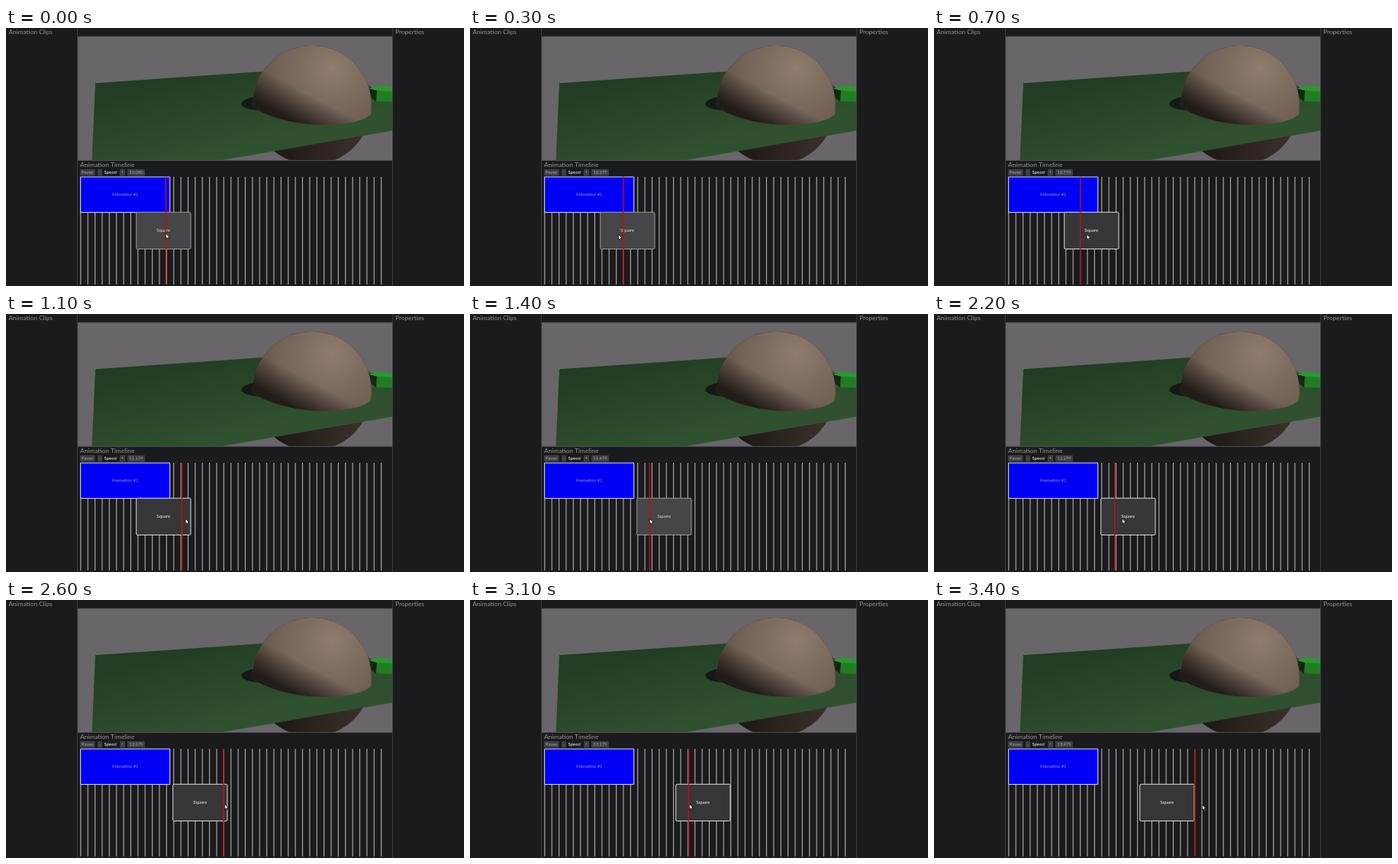
Write an HTML page with a canvas that moves like this. It is 600x338 px and loops after 3500 ms.

```html
<!DOCTYPE html>
<html lang="en">
<head>
<meta charset="utf-8">
<title>Animation timeline editor</title>
<style>
  html, body { margin: 0; width: 100%; height: 100%; overflow: hidden; background: #1b1a1c; }
  canvas { display: block; width: 600px; height: 338px; }
</style>
</head>
<body>
<canvas id="stage"></canvas>
<script>
const LOOP = 3500, STEP = 100;
const FONT = 'Lato, "Open Sans", sans-serif';
const BALL = { x: 400.7, y: 101, r: 78 };
const GRID = { x: 97.3, y: 195, gap: 9.375, count: 43, h: 141 };

// Each pointer move eases by an offset between two times
const moves = [
  { from: 0, to: 480, dx: -22, dy: 2 },
  { from: 480, to: 1130, dx: 48, dy: -3 },
  { from: 2050, to: 2550, dx: 51, dy: -1 },
  { from: 3080, to: 3370, dx: 65, dy: 1 }
];

// The block jumps by its shift when a drag is released
const drags = [
  { press: 700, release: 1400, shift: 48 },
  { press: 2100, release: 2800, shift: 51 },
  { press: 3000, release: LOOP, shift: 0 }
];

const canvas = document.getElementById('stage');
const ctx = canvas.getContext('2d');
const dpr = window.devicePixelRatio || 1;
canvas.width = 600 * dpr;
canvas.height = 338 * dpr;

function smooth(u) {
  u = Math.min(1, Math.max(0, u));
  return u * u * (3 - 2 * u);
}

function pointerAt(t) {
  let x = 209, y = 269;
  for (const m of moves) {
    const u = smooth((t - m.from) / (m.to - m.from));
    x += m.dx * u;
    y += m.dy * u;
  }
  return { x, y };
}

function blockAt(t) {
  const left = drags.reduce((x, d) => x + (t >= d.release ? d.shift : 0), 170.7);
  const pressed = drags.some(d => t >= d.press && t < d.release);
  return { left, pressed };
}

function rect(x, y, w, h, fill) {
  ctx.fillStyle = fill;
  ctx.fillRect(x, y, w, h);
}

function poly(points, fill) {
  ctx.beginPath();
  points.forEach(([x, y]) => ctx.lineTo(x, y));
  ctx.closePath();
  ctx.fillStyle = fill;
  ctx.fill();
}

function box(x, y, w, h, r, fill, stroke) {
  ctx.beginPath();
  ctx.roundRect(x, y, w, h, r);
  ctx.fillStyle = fill;
  ctx.fill();
  if (stroke) {
    ctx.strokeStyle = stroke;
    ctx.lineWidth = 1;
    ctx.stroke();
  }
}

function text(str, x, y, size, color, align = 'left') {
  ctx.font = `${size}px ${FONT}`;
  ctx.textAlign = align;
  ctx.fillStyle = color;
  ctx.fillText(str, x, y);
}

// Spreads the colours evenly over a gradient
function shade(gradient, ...colors) {
  colors.forEach((c, i) => gradient.addColorStop(i / (colors.length - 1), c));
  return gradient;
}

function drawPanels() {
  rect(0, 0, 600, 338, '#1b1a1c');
  rect(93, 0, 1, 338, '#3b3a3c');
  rect(506, 0, 1, 338, '#3b3a3c');
  text('Animation Clips', 3.5, 8.4, 8.3, '#949395');
  text('Properties', 510, 8.4, 8.4, '#949395');
  text('Animation Timeline', 97, 181.6, 8.4, '#949395');
}

function drawFloor() {
  poly([[117, 72.2], [336, 57], [440, 50], [506, 97], [506, 134.5], [278, 174], [112.5, 174]],
    shade(ctx.createLinearGradient(240, 60, 270, 170), '#233c24', '#284829', '#305130'));

  ctx.beginPath();
  ctx.moveTo(336, 89);
  ctx.bezierCurveTo(300, 92, 300, 105, 330, 108);
  ctx.fillStyle = '#141a14';
  ctx.fill();
}

function drawCube() {
  poly([[476, 79.5], [487, 75], [507, 78], [507, 83], [486, 82]], '#2a9a2c');
  poly([[476, 79.5], [486, 82], [485, 96], [478, 91]], '#0e2b10');
  poly([[486, 82], [507, 83], [507, 97], [485, 96]], '#237c25');
}

function drawDome() {
  ctx.beginPath();
  ctx.arc(BALL.x, BALL.y, BALL.r, Math.PI - 0.02, Math.PI * 2 + 0.16);
  ctx.bezierCurveTo(468, 122, 445, 127, 415, 127);
  ctx.bezierCurveTo(385, 127, 345, 119, 323, 103);
  ctx.closePath();
  ctx.fillStyle = shade(ctx.createRadialGradient(428, 53, 1, 424, 57, 108),
    '#907d6e', '#7f6d60', '#726155', '#5c4d43');
  ctx.fill();
  ctx.fillStyle = shade(ctx.createLinearGradient(379, 77, 360, 113),
    'rgba(30,24,20,0)', 'rgba(30,24,20,.93)');
  ctx.fill();
}

function drawScene() {
  ctx.save();
  ctx.beginPath();
  ctx.rect(94, 11, 412, 162.5);
  ctx.clip();
  rect(94, 11, 412, 163, '#686669');
  ctx.beginPath();
  ctx.arc(BALL.x, BALL.y, BALL.r, 0, Math.PI * 2);
  ctx.fillStyle = shade(ctx.createLinearGradient(350, 0, 466, 0), '#1d1815', '#3a302a');
  ctx.fill();
  drawFloor();
  drawCube();
  drawDome();
  ctx.restore();
  rect(94, 10.7, 412, 0.8, '#484749');
  rect(94, 173.3, 412, 0.8, '#555456');
}

function button(label, x, w) {
  box(x, 185, w, 8.5, 1, '#3f3e40');
  text(label, x + w / 2, 191.2, 5.9, '#a5a4a6', 'center');
}

function drawToolbar(t) {
  button('Pause', 97, 19.5);
  button('-', 120, 6);
  text('Speed', 128.5, 191.2, 6, '#f4f4f4');
  button('+', 149, 7);
  button(((10080 + t - Math.min(t, 1)) / 1000).toFixed(3), 159, 23);
}

function drawCursor({ x, y }) {
  ctx.save();
  ctx.translate(x + 0.3, y);
  ctx.scale(0.9, 0.9);
  ctx.lineJoin = 'round';
  ctx.lineWidth = 1;
  ctx.strokeStyle = '#111';
  poly([[0, 0], [0, 8], [1.9, 6.3], [3.2, 9], [4.5, 8.4], [3.3, 5.8], [5.6, 5.6]], '#fff');
  ctx.stroke();
  ctx.restore();
}

function drawTimeline(t) {
  for (let i = 0; i < GRID.count; i++) {
    rect(GRID.x + i * GRID.gap, GRID.y, 1.1, GRID.h, '#b2b1b3');
  }
  box(97.7, 195.1, 117, 46.5, 0, '#0000f6', '#dcdce8');
  text('Animation #1', 156, 220.3, 5.9, '#8c8cb4', 'center');

  const { left, pressed } = blockAt(t);
  box(left, 241.3, 71.3, 48.2, 1.5, pressed ? '#373638' : '#464547', pressed ? '#dcdcdc' : '#9a999b');
  text('Square', left + 35.5, 267.3, 5.9, pressed ? '#f4f4f4' : '#dedede', 'center');

  // The playhead trails the pointer by one step
  const head = pointerAt(t - STEP);
  rect(head.x - 0.4, GRID.y, 1.5, GRID.h, '#bc1216');
  drawCursor(pointerAt(t));
}

function draw(t) {
  ctx.setTransform(dpr, 0, 0, dpr, 0, 0);
  drawPanels();
  drawScene();
  drawToolbar(t);
  drawTimeline(t);
}

const start = performance.now();
let shown = -1;
function tick() {
  const t = Math.floor(((performance.now() - start) % LOOP) / STEP) * STEP;
  if (t !== shown) draw(shown = t);
  requestAnimationFrame(tick);
}
tick();
</script>
</body>
</html>
```
